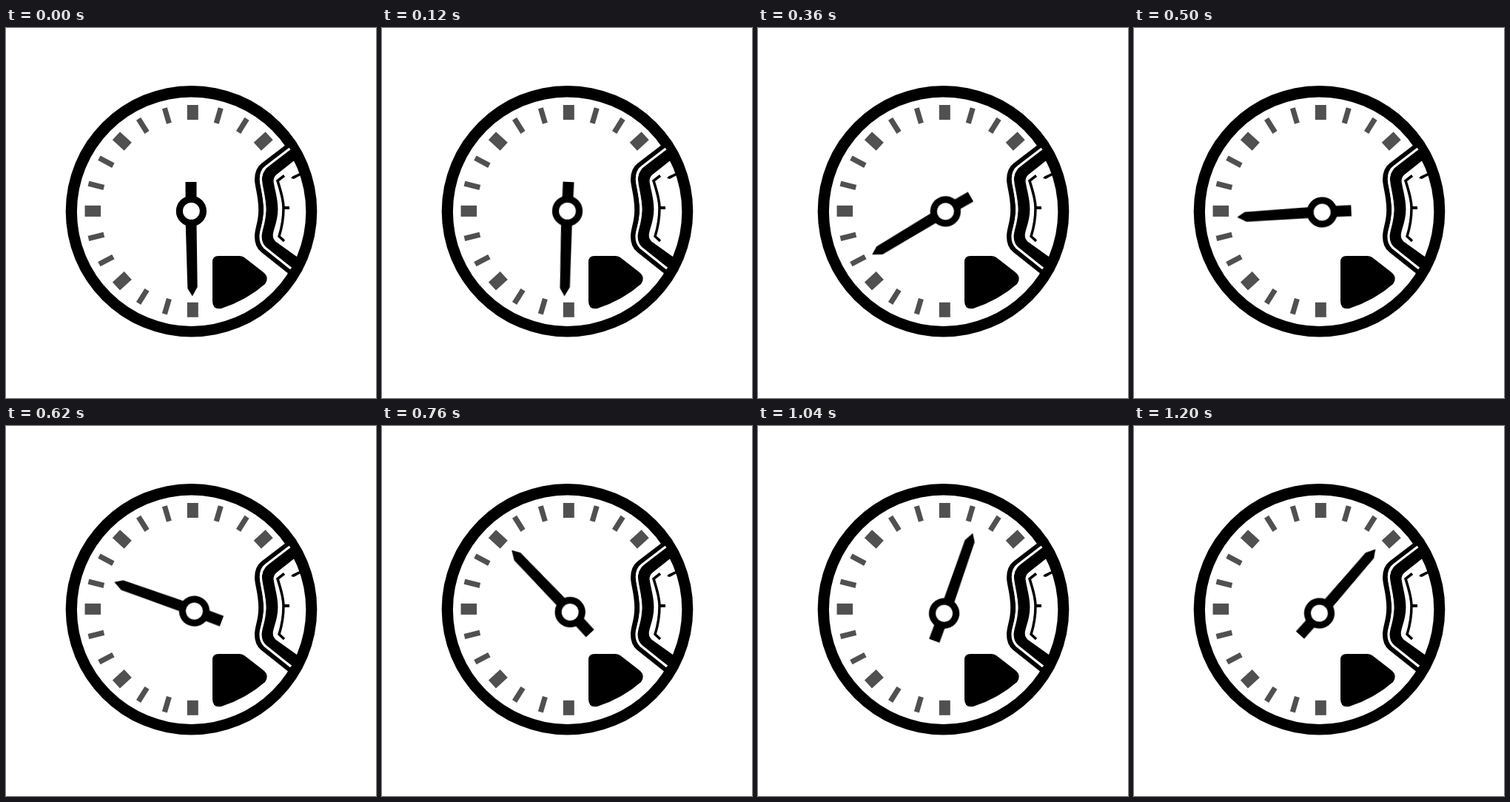
Write an HTML page that moves like this. It is 500x500 px and loops after 1220 ms.

```html
<!DOCTYPE html>
<html lang="en">
<head>
<meta charset="utf-8">
<title>Gauge</title>
<style>
  html, body { margin: 0; width: 100%; height: 100%; overflow: hidden; background: #fff; }
  svg { display: block; width: 100vw; height: 100vh; }
  .line { fill: none; stroke: #000; }
  .tick { fill: #505050; }
  #needle { transform-origin: 251.5px 250.2px; animation: sweep 1220ms infinite; }

  /* Each segment's curve meets the next one at the same speed. */
  @keyframes sweep {
    0%      { transform: rotate(0deg);     animation-timing-function: cubic-bezier(.333, .08, .667, .1); }
    18.033% { transform: rotate(11.8deg);  animation-timing-function: cubic-bezier(.333, .134, .667, .74); }
    29.508% { transform: rotate(60deg);    animation-timing-function: cubic-bezier(.333, .464, .667, .64); }
    40.984% { transform: rotate(87.2deg);  animation-timing-function: cubic-bezier(.333, .366, .667, .643); }
    62.295% { transform: rotate(137.2deg); animation-timing-function: cubic-bezier(.333, .308, .667, .655); }
    73.77%  { transform: rotate(168.1deg); animation-timing-function: cubic-bezier(.333, .345, .667, .73); }
    88.525% { transform: rotate(208deg);   animation-timing-function: cubic-bezier(.333, .51, .667, .84); }
    98.361%, 100% { transform: rotate(222deg); }
  }
</style>
</head>
<body>
<svg viewBox="0 0 500 500">
  <circle cx="250.5" cy="247.7" r="169.8"/>
  <circle cx="250.6" cy="248.2" r="154.7" fill="#fff"/>
  <g id="ticks"></g>

  <g class="line">
    <path stroke-width="7" d="M381 160 L347 186 Q339.5 192 339.5 205 C340 216 344.7 226 344.7 246 C344.7 264 339.5 270 339.5 282 Q339.5 294 347 300 L386 331"/>
    <path stroke-width="16" d="M392 167 L361 191.5 Q353 198 353.6 208 C355 220 359.4 230 359.4 245 C359.4 262 352.7 270 352.7 280 Q352.7 290 361 296 L396 321"/>
    <path stroke="#fff" stroke-width="3.2" d="M383.5 163 L351.5 187.5 Q344.3 193 344.3 204 C345 216 349.8 228 349.8 246 C349.8 264 344 272 344 282 Q344 291 350 297 L385 325"/>
    <path stroke-width="3.5" d="M376 199.5 L367 206.5 C371 219 375 231 375 243 C375 256 373 269 369 281.5 L376 288"/>
    <path stroke-width="4" d="M375 243 H383"/>
  </g>
  <path d="M385 203 L387 200.5 L398 195.5 L399 198.5 L389 204 Z"/>

  <path d="M287 308 H315 Q319 308 322 310 L349 331 Q356 338 350 346 Q325 368 291 379 Q279 381 279 369 V316 Q279 308 287 308 Z"/>

  <g id="needle">
    <path d="M242.5 208 H257.5 V264 L258.7 350 L251.9 362.5 L245.4 352 L242.7 264 Z"/>
    <circle class="line" cx="250.4" cy="247.4" r="16" stroke-width="9.2" style="fill:#fff"/>
  </g>
</svg>
<script>
  let ticks = '';
  for (let a = -180; a <= 45; a += 15) {
    const rad = a * Math.PI / 180;
    const x = 252.3 + 135 * Math.sin(rad);
    const y = 247.4 - 133.4 * Math.cos(rad);
    const tilt = a + 2.5 * Math.sin(2 * rad);
    const w = a % 45 ? 7.2 : 15;
    const h = a % 180 ? 21.5 : 20;
    ticks += `<rect class="tick" x="${-w / 2}" y="${-h / 2}" width="${w}" height="${h}" transform="translate(${x} ${y}) rotate(${tilt})"/>`;
  }
  document.getElementById('ticks').innerHTML = ticks;
</script>
</body>
</html>
```
